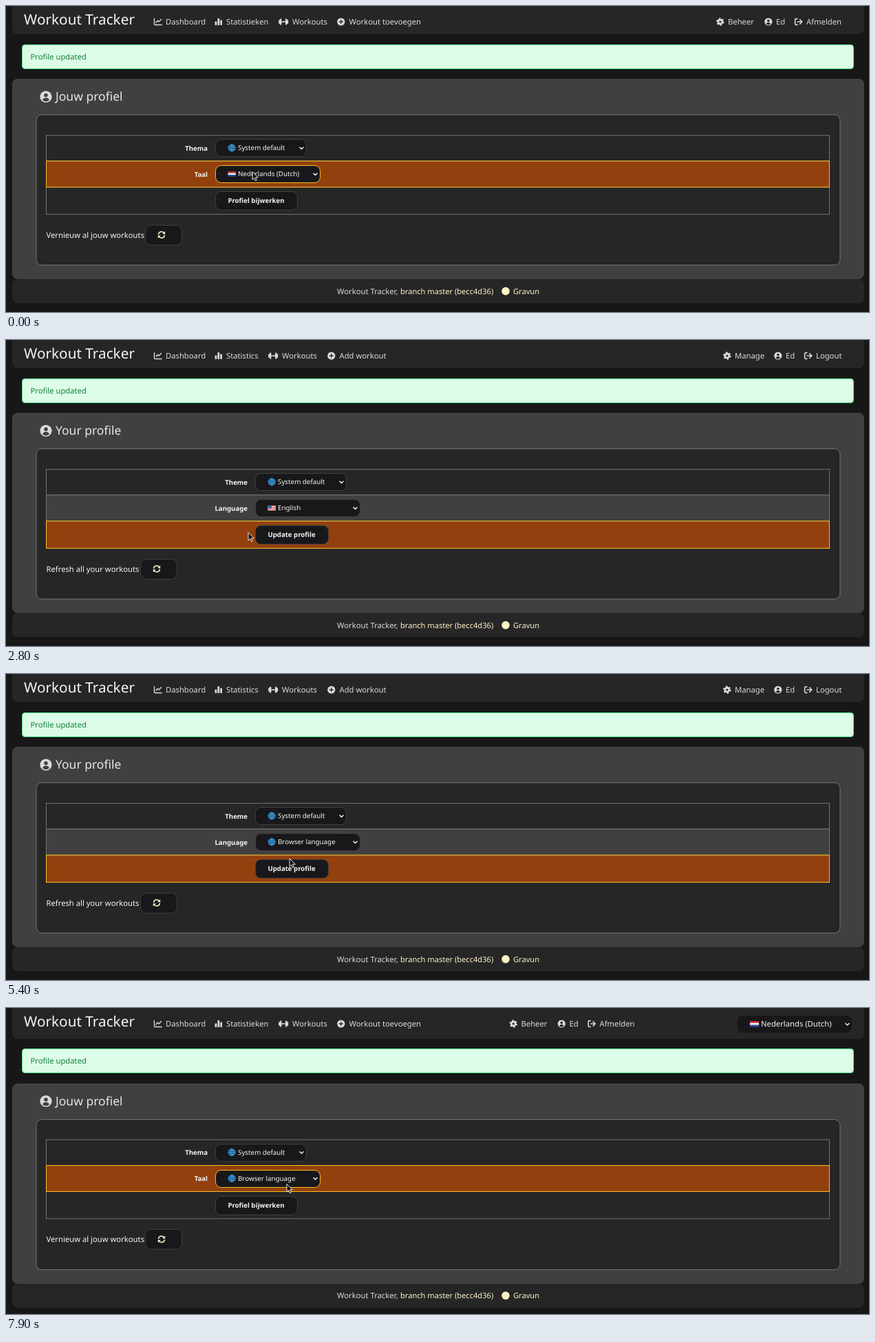
An HTML page that plays this animation: 1254x446 px, repeating every 8000 ms.

```html
<!DOCTYPE html>
<html lang="en">
<head>
<meta charset="utf-8">
<title>Profile language</title>
<style>
html, body { margin: 0; width: 100%; height: 100%; overflow: hidden; background: #171717; }
svg { display: block; width: 1254px; height: 446px; }
text { font-family: "Noto Sans", sans-serif; text-rendering: geometricPrecision; white-space: pre; }
</style>
</head>
<body>
<svg id="stage" viewBox="0 0 1254 446"></svg>
<script>
const stage = document.getElementById('stage');
const LOOP = 8000, STEP = 100, BODY = 11.25, SMALL = 9.8;
const DARK = '#262626', MID = '#404040', LINE = '#737373', FIELD = '#18181b';
const INK = '#dadada', BRIGHT = '#f5f5f5', CREAM = '#fef3c7', AMBER = '#fbbf24', RUST = '#92400e';

const LANGS = ['Browser language', 'English', 'Nederlands (Dutch)'];
const NL = {
  left: 304, button: 119, refresh: 202,
  nav: [[215, 'line', 'Dashboard'], [303, 'bars', 'Statistieken'], [396, 'dumbbell', 'Workouts'], [481, 'plus', 'Workout toevoegen']],
  user: [[1032, 'gear', 'Beheer'], [1102, 'user', 'Ed'], [1146, 'exit', 'Afmelden']],
  title: 'Jouw profiel', theme: 'Thema', lang: 'Taal', update: 'Profiel bijwerken', again: 'Vernieuw al jouw workouts'
};
const EN = {
  left: 362, button: 106, refresh: 195,
  nav: [[215, 'line', 'Dashboard'], [303, 'bars', 'Statistics'], [381, 'dumbbell', 'Workouts'], [467, 'plus', 'Add workout']],
  user: [[1042, 'gear', 'Manage'], [1116, 'user', 'Ed'], [1160, 'exit', 'Logout']],
  title: 'Your profile', theme: 'Theme', lang: 'Language', update: 'Update profile', again: 'Refresh all your workouts'
};

// Pointer moves: start, end, target x, target y
const MOVES = [
  [100, 900, 352, 280.5], [3800, 4600, 412, 255], [4900, 5200, 412, 269],
  [5400, 6200, 434, 291], [7500, 7900, 408, 256.5]
];

function pointerAt(t) {
  let x = 358, y = 241.5;
  for (const [from, to, tx, ty] of MOVES) {
    const p = Math.min(1, Math.max(0, (t - from) / (to - from)));
    const e = p * p * (3 - 2 * p);
    x += (tx - x) * e;
    y += (ty - y) * e;
  }
  return { x, y };
}

const within = (t, a, b) => t >= a && t < b;
const at = (x, y, s) => `<g transform="translate(${x} ${y})">${s}</g>`;
const scaled = (k, s) => `<g transform="scale(${k})">${s}</g>`;
const path = (d, attrs) => `<path d="${d}" ${attrs}/>`;
const stroke = (d, color, w) => path(d, `fill="none" stroke="${color}" stroke-width="${w}" stroke-linecap="round" stroke-linejoin="round"`);
const circle = (x, y, r, attrs) => `<circle cx="${x}" cy="${y}" r="${r}" ${attrs}/>`;
const rect = (x, y, w, h, fill, r = 0, border = '') =>
  `<rect x="${x}" y="${y}" width="${w}" height="${h}" rx="${r}" fill="${fill}"${border && ` stroke="${border}"`}/>`;
const text = (x, y, s, size = BODY, fill = INK, attrs = '') =>
  `<text x="${x}" y="${y}" font-size="${size}" fill="${fill}" ${attrs}>${s}</text>`;
const bold = (x, y, s, anchor) => text(x, y, s, 9.65, BRIGHT, `font-weight="700" text-anchor="${anchor}"`);

// Icons are centred on their origin
const person = hole => circle(0, 0, 5.6, `fill="${INK}"`) + circle(0, -1.5, 1.8, `fill="${hole}"`) +
  path('M-3.2 3.3Q-2.6 1 0 1T3.2 3.3Q0 5.8-3.2 3.3Z', `fill="${hole}"`);
const ICONS = {
  line: stroke('M-5.3-4.6V3.2Q-5.3 4.5-4 4.5H5.4M-2.7 1L-.4-1.8 1.4 0 4.6-3.4', INK, 1.4),
  bars: rect(-5.2, -.6, 2.7, 5.6, INK, .8) + rect(-1.4, -5, 2.8, 10, INK, .8) + rect(2.5, -2.6, 2.7, 7.6, INK, .8),
  dumbbell: rect(-5.2, -4.4, 2.4, 8.8, INK, .9) + rect(2.8, -4.4, 2.4, 8.8, INK, .9) +
    rect(-7, -2.8, 2.6, 5.6, INK, .9) + rect(4.4, -2.8, 2.6, 5.6, INK, .9) + rect(-3, -.8, 6, 1.6, INK),
  plus: circle(0, 0, 5.6, `fill="${INK}"`) + stroke('M-2.5 0H2.5M0-2.5V2.5', DARK, 1.3),
  gear: circle(0, 0, 3, `fill="none" stroke="${INK}" stroke-width="2.8"`) +
    circle(0, 0, 4.8, `fill="none" stroke="${INK}" stroke-width="1.9" stroke-dasharray="2.5 2.527"`),
  user: person(DARK),
  exit: stroke('M-2-4.4H-3.6Q-5.2-4.4-5.2-2.8V2.8Q-5.2 4.4-3.6 4.4H-2M-1.6 0H4.6M1.8-3.2L5 0 1.8 3.2', INK, 1.6),
  refresh: stroke('M-4.4-1A4.5 4.5 0 0 1 3.6-2.8M4.4 1A4.5 4.5 0 0 1-3.6 2.8', CREAM, 1.5) +
    path('M5.2-5V-1H1.2ZM-5.2 5V1H-1.2Z', `fill="${CREAM}"`),
  globe: circle(0, 0, 5.2, 'fill="#14507c"') +
    stroke('M-5 0H5M0-5V5M-4.2-2.7H4.2M-4.2 2.7H4.2M0-5Q-5 0 0 5Q5 0 0-5M-5 0A5 5 0 0 1 5 0A5 5 0 0 1-5 0', '#4aa3df', .8)
};

function flag(lang) {
  if (lang === 0) return ICONS.globe;
  if (lang === 2) return rect(-5.7, -3.7, 11.4, 2.5, '#c62f3d', .5) + rect(-5.7, -1.3, 11.4, 2.6, '#f4f4f4') + rect(-5.7, 1.2, 11.4, 2.5, '#23519c', .5);
  let s = rect(-5.7, -3.8, 11.4, 7.6, '#eeeeee', .5);
  for (let i = 0; i < 4; i++) s += rect(-5.7, -3.8 + i * 2.17, 11.4, 1.09, '#d0484e');
  return s + rect(-5.7, -3.8, 5.4, 4.3, '#3c5a94');
}

const chevron = (x, y) => at(x, y, stroke('M-2.6-1.3L0 1.3 2.6-1.3', BRIGHT, 1.4));
const LABEL_GAP = { dumbbell: 20, plus: 17.5 };
const navItem = ([x, icon, label], shift) =>
  at(x + shift + (icon === 'dumbbell' ? 7.2 : 5.8), 23, ICONS[icon]) + text(x + shift + (LABEL_GAP[icon] || 17), 27, label);

const ARROW = path('M0 0V11.6L2.7 9.1 4.5 13.2 6.3 12.4 4.6 8.4H8.3Z', 'fill="#111" stroke="#fff" stroke-width=".9"');
const HAND = path('M-1.2.8Q0-.7 1.2.8V4.6L5.3 5.5Q6.9 6 6.7 7.8L6 11.6H-.5L-3.7 7.5Q-3.9 5.9-2.2 6.4L-1.2 7.3Z',
  'fill="#111" stroke="#fff" stroke-width="1" stroke-linejoin="round"');

function scene(t) {
  const ui = within(t, 2700, 6700) ? EN : NL;
  const wideNav = t >= 6700;
  const dy = wideNav ? 3.5 : 0;
  const Y = y => Math.round(y + dy);
  const mouse = pointerAt(t), mouseY = mouse.y - dy;
  const open = within(t, 100, 1600) || within(t, 4700, 5400);
  const chosen = t < 1600 ? 2 : t < 5400 ? 1 : 0;
  const hand = within(t, 2100, 2800) || within(t, 5500, 6800);
  const row = open || mouseY < 264 ? 1 : 2;
  const x = ui.left;
  const onSelect = row === 1 && mouse.x > x && mouseY < 258;
  const onButton = mouseY >= 269.5 && mouse.x > x && mouse.x < x + ui.button;

  const field = (y, w, h, hot) => rect(x + .5, Y(y) + .5, w, h, FIELD, 8, hot ? AMBER : MID);
  const select = (y, w, lang, label, hot) => field(y, w, 25, hot) + at(x + 24.2, y + dy + 12.8, flag(lang)) +
    text(x + 33, y + dy + 16.4, label, SMALL, BRIGHT) + chevron(x + w - 6.5, y + dy + 13.3);

  // Page chrome
  let s = rect(9, -10, 1238, Y(41.2) + 10, DARK, 8) + text(26, 27, 'Workout Tracker', 20.75, BRIGHT);
  s += ui.nav.map(i => navItem(i, 0)).join('') + ui.user.map(i => navItem(i, wideNav ? -300.5 : 0)).join('');
  if (wideNav) {
    s += rect(1063, 11, 166, 25, FIELD, 8) + at(1087.5, 23.3, scaled(1.15, flag(2))) +
      text(1097, 27, LANGS[2], BODY, BRIGHT) + chevron(1222.5, 23.8);
  }
  s += rect(23.5, Y(55.9) + .5, 1208, 35, '#dcfce7', 4, '#4ade80') + text(35.5, 77.8 + dy, 'Profile updated', BODY, '#15803d');
  s += rect(9, Y(106.3), 1238, 292, MID, 8) + rect(9, Y(398.3), 1238, 35, DARK, 8);
  s += at(58, 132.2 + dy, scaled(1.53, person(MID))) + text(72, 138.2 + dy, ui.title, 17.5, '#e5e5e5');
  s += rect(44, Y(158.2) + .5, 1168, 219, DARK, 8, LINE);

  // Settings table
  const lines = [188.4, 226, 264, 303.6].map(y => y + dy);
  const cell = (i, fill, border) => rect(58.5, lines[i], 1138, lines[i + 1] - lines[i], fill, 0, border);
  s += cell(0, DARK, LINE) + cell(1, MID, LINE) + cell(2, DARK, LINE) + cell(row, RUST, AMBER);
  s += bold(x - 11, 210.7 + dy, ui.theme, 'end') + bold(x - 11, 248.8 + dy, ui.lang, 'end');
  s += select(194, 132, 0, 'System default', false) + select(232, 152, chosen, LANGS[chosen], onSelect);
  if (!open) s += field(270, ui.button, 27, onButton) + bold(x + ui.button / 2, 287 + dy, ui.update, 'middle');

  s += text(58.5, 337.5 + dy, ui.again, BODY, BRIGHT) + rect(ui.refresh + .5, Y(318.6) + .5, 53, 29, FIELD, 8, MID) +
    at(ui.refresh + 24, 333.5 + dy, ICONS.refresh);
  s += text(481, 419.5 + dy, 'Workout Tracker,') + text(573, 419.5 + dy, 'branch master (becc4d36)', 11.1, CREAM) +
    circle(726, 415.6 + dy, 5.8, `fill="${CREAM}"`) + text(737, 419.5 + dy, 'Gravun', 11.1, CREAM);

  if (open) {
    const active = mouse.y < 260 ? chosen : Math.floor((mouse.y - 260) / 18);
    s += rect(x, 258, 153, 59, '#1f1f1f', 5) + rect(x + 2.5, 260 + active * 18, 147, 18, MID, 2);
    LANGS.forEach((name, i) => {
      s += at(x + 12.5, 269.3 + i * 18, flag(i)) + text(x + 19.5, 272.6 + i * 18, name, SMALL, BRIGHT);
    });
  }
  return s + at(mouse.x, mouse.y, hand ? HAND : ARROW);
}

let shown = -1;
function tick(now) {
  const t = Math.floor((now % LOOP) / STEP) * STEP;
  if (t !== shown) stage.innerHTML = scene(shown = t);
  requestAnimationFrame(tick);
}
tick(performance.now());
</script>
</body>
</html>
```
